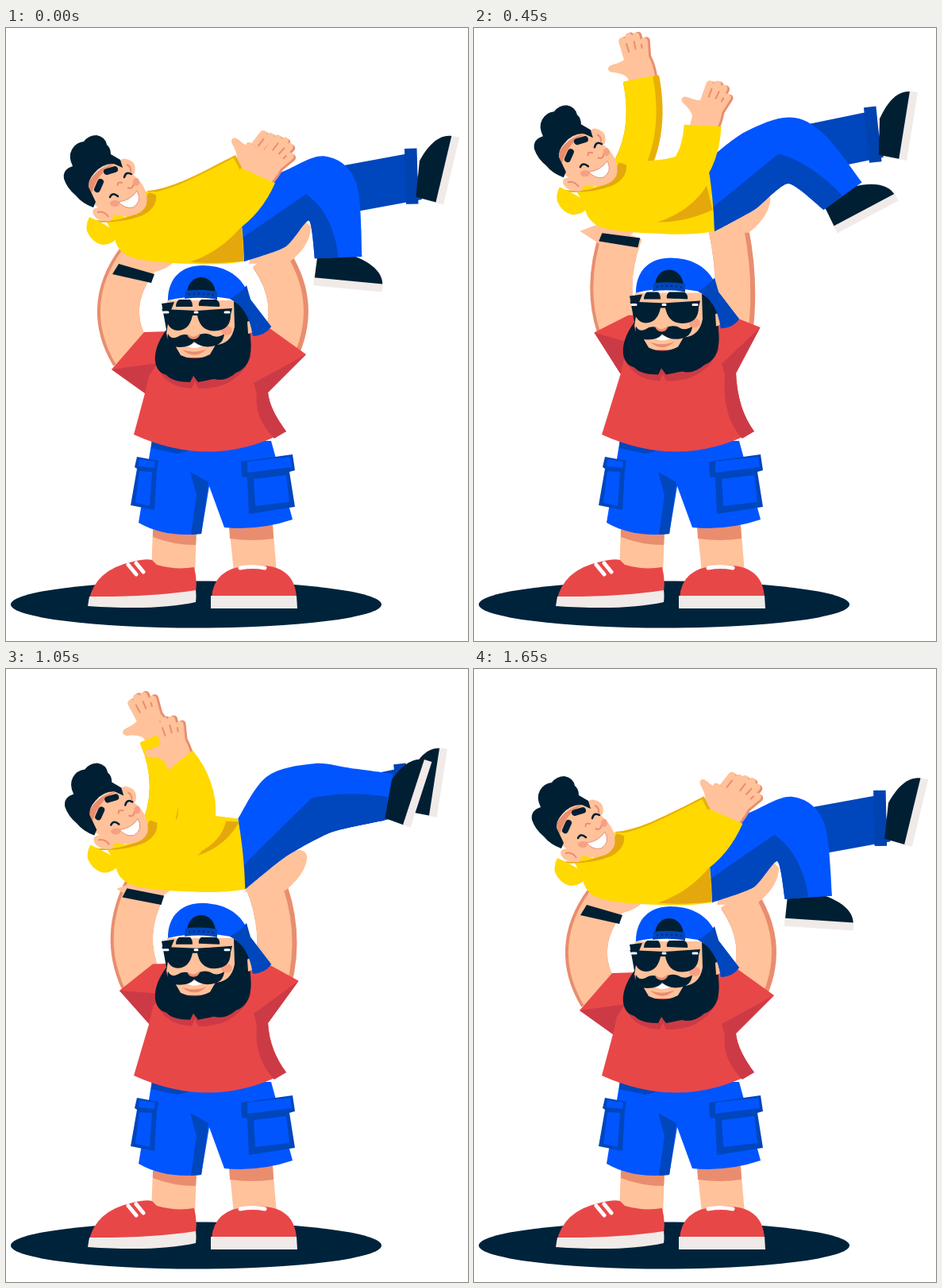
Recreate the animation shown at these times as an HTML page. Size 582 by 772 pixels, loop 1.68 s.

```html
<!DOCTYPE html>
<html lang="en">
<head>
<meta charset="utf-8">
<title>Lift</title>
<style>
  html, body { margin: 0; width: 100%; height: 100%; overflow: hidden; background: #fff; }
  svg { display: block; width: 100%; height: 100%; }
  .skin { fill: #ffc29b; } .tan { fill: #e98d6e; } .blush { fill: #f7a083; }
  .blue { fill: #05f; } .deep { fill: #0046bc; }
  .red { fill: #e84748; } .wine { fill: #cc3b45; }
  .ink { fill: #001f33; } .sole { fill: #f0ebe8; }
  .yellow { fill: #ffd900; } .gold { fill: #e5a80c; }
  .line { fill: none; stroke: #001f33; stroke-linecap: round; }
  .crease { fill: none; stroke: #e98d6e; stroke-width: 2; }
  .limb { fill: none; }
</style>
</head>
<body>
<svg viewBox="0 0 582 772" preserveAspectRatio="none">
  <defs>
    <g id="shoe">
      <path class="ink" d="M-9 43L-36 42L-42-3C-37-22-27-42-9-43Z"/>
      <path class="sole" d="M-10-43.5H0V43.5H-10Z"/>
    </g>
    <path id="fingers" fill="none" stroke-width="9.500" stroke-linecap="round" d="M24-9L52-9M24-1L55 0M24 7L53 9M22 12L44 17"/>
    <path id="palm" d="M-12-15L6-16Q13-19 19-34Q24-39 27-33Q26-22 29-13L34 14Q16 22-12 16Z"/>
    <g id="hand">
      <g transform="translate(0 3)"><use href="#palm" class="tan"/><use href="#fingers" stroke="#e98d6e"/></g>
      <use href="#palm" class="skin"/><use href="#fingers" stroke="#ffc29b"/>
      <path d="M36-5L48-5M37 4L48 5M36 12L42 13" class="crease" stroke-width="1"/>
    </g>
  </defs>

  <ellipse fill="#00233c" cx="239.500" cy="726" rx="233.500" ry="29.500"/>

  <!-- lifter's arms -->
  <g class="limb">
    <path id="armL0" stroke="#e98d6e" stroke-width="53"/><path id="armL" stroke="#ffc29b" stroke-width="49"/>
    <path id="armR0" stroke="#e98d6e" stroke-width="50"/><path id="armR" stroke="#ffc29b" stroke-width="44"/>
  </g>
  <g id="palms" class="skin">
    <path d="M144 293L168 284H218Q212 301 188 307L176 314Z"/>
    <path d="M306 297L357 295Q383 274 384 252Q380 239 362 248L312 270Z"/>
  </g>
  <path id="band" class="ink"/>

  <g id="friend">
    <use href="#hand" id="handFar"/>
    <g class="limb"><path id="sleeveFar0" stroke="#e8b006" stroke-width="46"/><path id="sleeveFar" stroke="#ffd900" stroke-width="38"/></g>
    <path id="legFar" class="limb" stroke="#0046bc" stroke-width="60"/>
    <path id="cuffFar" class="limb" stroke="#0042b0" stroke-width="70"/>
    <use href="#shoe" id="footFar"/>
    <use href="#shoe" id="footNear"/>
    <path id="leg" class="blue"/><path id="legShade" class="deep"/>
    <path class="yellow" d="M176 206Q225 207 250 200L291 205Q299 250 300 294Q270 299 235 297Q165 295 150 285Q137 276 137 262L116 226L150 238Z"/>
    <path id="fold" class="gold"/>
    <use href="#hand" id="handNear"/>
    <path id="sleeve" class="limb" stroke="#ffd900" stroke-width="47"/>
    <path class="gold" d="M104 240Q132 248 164 234L180 207L189 210Q191 226 172 236Q144 247 108 244Z"/>
    <path class="yellow" d="M105 238Q126 247 144 260Q134 274 121 273Q108 270 102 256Q100 247 105 238Z"/>

    <!-- head -->
    <path class="skin" d="M143 168Q147 162 155 166Q165 170 162 183L154 188ZM122 226Q106 225 110 235Q116 245 132 243L138 232Z"/>
    <path d="M152 172Q158 174 157 182M115 232Q124 230 129 238" class="crease"/>
    <path class="skin" d="M102 200Q108 180 136 166L148 174Q158 182 166 190Q180 205 177 222Q172 236 150 237Q126 236 110 221Z"/>
    <path class="tan" d="M103 197Q112 176 140 170Q116 180 108 208Z"/>
    <path class="ink" d="M73 190Q71 178 84 174Q78 162 83 153Q88 144 98 143Q104 135 114 135Q125 137 127 147Q132 151 132 159L144 166L147 176L136 171Q122 170 111 183Q103 192 104 200L113 219L110 226Q96 221 88 211Q77 202 73 190Z"/>
    <path class="line" stroke-width="8" d="M115 203L119 194M127 181L137 178"/>
    <path class="line" stroke-width="2.500" d="M131 213Q134 206 141 212M149 188Q151 180 158 184"/>
    <path d="M141 199Q139 193 147 195M153 201Q160 204 161 195" class="crease"/>
    <ellipse class="blush" cx="137" cy="221" rx="6" ry="4"/><ellipse class="blush" cx="164" cy="194" rx="4" ry="5"/>
    <path fill="#fff" stroke="#e98d6e" d="M142 219Q157 217 165 205Q172 219 160 226Q149 228 142 219Z"/>
  </g>

  <!-- lifter's legs and shorts -->
  <path class="skin" d="M185 630L240 634L238 686H183ZM281 626H336L341 686H287Z"/>
  <path class="tan" d="M185 632L240 634L239 651Q210 651 185 641ZM281 626H336L337 643Q310 647 282 643Z"/>
  <path class="red" d="M104 722Q112 682 160 672Q176 668 184 670L190 676Q214 683 237 679Q242 698 238 716ZM259 718Q261 680 306 677Q364 672 366 718Z"/>
  <path class="sole" d="M103 728L105 716Q180 717 239 708Q240 716 239 723Q190 734 103 728ZM258 715H366L367 731H258Z"/>
  <path d="M154 676L164 688M164 674L173 685M295 680Q311 677 326 680" fill="none" stroke="#fff" stroke-width="5" stroke-linecap="round"/>
  <path class="blue" d="M184 518L334 520L345 560L361 619Q320 633 275 629L256 577L246 637Q200 642 167 623Z"/>
  <path class="deep" d="M184 518L240 530L216 536L183 529ZM232 559L255 572L246 637L233 638L240 588Z"/>
  <path class="deep" d="M165 540L192 545L190 557L187 607L157 601L165 555L162 553ZM296 546L361 537L364 557L357 559L364 603L306 612L304 566L297 565Z"/>
  <path class="blue" d="M168 543L188 546L187 554L167 552ZM168 558L184 559L181 602L163 598ZM304 546L358 540L360 553L304 560ZM312 568L353 563L357 597L314 602Z"/>

  <path id="shirt" class="red"/><path id="shirtShade" class="wine"/>

  <!-- lifter's head -->
  <g id="head">
    <path class="wine" d="M189 420Q196 452 234 454L238 445L242 454Q290 456 309 414L300 400H195Z"/>
    <path class="skin" d="M203 343H290L300 400L270 415H212L202 384Z"/>
    <path class="ink" d="M196 347L212 345L206 360L202 385Q203 397 213 400L220 412Q238 421 257 411L264 399Q284 398 288 376L287 344L306 356L308 390Q312 426 290 434Q276 446 262 442L242 446L236 438L232 446Q210 446 202 437Q190 434 188 420Q186 402 202 380Z"/>
    <path class="skin" d="M304 370Q313 364 313 375Q311 385 305 385Z"/>
    <path class="tan" d="M222 405Q238 411 253 404Q238 419 222 405Z"/>
    <path fill="#fff" d="M223 398L253 396Q240 409 223 398Z"/>
    <path class="ink" d="M237 391Q226 382 216 389Q208 393 204 385Q201 402 219 402Q232 402 237 395Q246 403 259 401Q274 399 275 385Q266 392 257 386Q246 382 237 391Z"/>
    <ellipse class="blush" cx="278" cy="381" rx="7" ry="6"/>
    <ellipse class="skin" cx="236" cy="380" rx="8" ry="10"/>
    <path class="tan" d="M228 385Q236 393 245 384Q243 392 236 392Q229 391 228 385Z"/>
    <path class="ink" d="M218 342H232Q235 345 235 351H214Q214 345 218 342ZM246 342H265Q270 345 269 351L243 350Q242 345 246 342Z"/>
    <path class="ink" d="M196 354L240 356L285 353L283 361Q283 381 263 381.500Q245 382 241 362H235Q231 381 216 381Q203 380 201 362Z"/>
    <path d="M199 358H204M276 358H281M238 358H241" stroke="#fff" stroke-width="3" stroke-linecap="round"/>
    <path class="blue" d="M204 343C204 314 222 299 248 299C282 300 300 316 308 342L334 376Q327 387 311 388Q306 352 282 341Q244 334 204 343Z"/>
    <path class="deep" d="M282 341Q296 334 303 324L308 342L334 376Q327 387 311 388Q306 352 282 341Z"/>
    <path class="ink" d="M228 334C229 308 262 307 264 334Z"/>
    <path class="deep" d="M226 331Q246 328 266 332L266 342Q246 338 225 341Z"/>
    <path d="M230 335.500Q246 333 263 336.500" fill="none" stroke="#002a78" stroke-width="2" stroke-dasharray="2 4"/>
  </g>
</svg>
<script>
const LOOP = 1680, STEP = 30, PEAK = 570, REST = 1440;
const { PI, sin, cos } = Math;

const $ = id => document.getElementById(id);
const draw = (id, d) => $(id).setAttribute('d', d);
const place = (id, x, y, a = 0) => $(id).setAttribute('transform', `translate(${x} ${y}) rotate(${a})`);

const mix = (a, b, k) => a + (b - a) * k;
const blend = (a, b, k) => a.map((v, i) => mix(v, b[i], k));
const ease = u => .5 - .5 * cos(PI * Math.min(1, u));
// 0 to 1 and back once per loop, highest at the given time
const swing = (t, top) => .5 + .5 * cos(2 * PI * (t - top) / LOOP);
const liftAt = t => t < PEAK ? ease((t / PEAK) ** .6) : 1 - ease((t - PEAK) / (REST - PEAK));

const pairs = a => Array.from({ length: a.length / 2 }, (_, i) => a.slice(2 * i, 2 * i + 2));
const poly = a => `M${pairs(a).join('L')}Z`;
const bow = ([ax, ay, bx, by, cx, cy], dx = 0) => `M${ax + dx} ${ay}Q${bx + dx} ${by} ${cx + dx} ${cy}`;

// smooth curve through points
function smooth(p, k = 1 / 6) {
  let d = '';
  for (let i = 0; i < p.length - 1; i++) {
    const a = p[i - 1] || p[i], b = p[i], c = p[i + 1], e = p[i + 2] || c;
    d += `C${b[0] + (c[0] - a[0]) * k} ${b[1] + (c[1] - a[1]) * k} ` +
         `${c[0] - (e[0] - b[0]) * k} ${c[1] - (e[1] - b[1]) * k} ${c}`;
  }
  return d;
}

// point given in the turned frame of a foot
function onFoot([x, y, a], dx, dy) {
  const c = cos(a * PI / 180), s = sin(a * PI / 180);
  return [x + dx * c - dy * s, y + dx * s + dy * c];
}

function drawLifter(l) {
  const e = l ** .75;
  const left = blend([158, 412, 122, 352, 164, 294], [181, 374, 164, 320, 187, 256], e);
  const right = blend([346, 402, 371, 344, 332, 288], [325, 386, 334, 318, 319, 246], e);
  draw('armL0', bow(left));
  draw('armL', bow(left, 2));
  draw('armR0', bow(right));
  draw('armR', bow(right, -3));
  place('palms', -11 * l, -39 * l);
  draw('band', poly(blend([142, 297, 187, 310, 183, 321, 134, 310], [162, 257, 210, 263, 207, 275, 158, 267], e)));

  // sleeve corners: top, outer, inner
  const [a, b, c] = pairs(blend([174, 383, 133, 430, 175, 460], [195, 361, 152, 382, 185, 435], e));
  const [d, f, g] = pairs(blend([332, 378, 378, 411, 330, 459], [316, 359, 360, 376, 330, 434], e));
  draw('shirt', `M${a}L${b}L${c}L161 512Q260 557 353 508Q332 480 ${g}L${f}L${d}Z`);
  draw('shirtShade', `M${b}L${c}L${c[0] + 5} ${c[1] - 22}L${c[0] + 16} ${c[1] - 38}Z` +
    `M${f}L${g}Q332 480 353 508L338 517Q312 490 316 ${g[1] + 2}L312 ${g[1] - 12}Z`);
  place('head', 0, -10 * l);
}

function drawArm(name, low, high, k, arch, turn) {
  const p = blend(low, high, k);
  const [s, c1, c2, w] = pairs(p);
  w[1] -= arch;
  place('hand' + name, w[0], w[1], -52 - turn * k);
  return `M${s}C${c1} ${c2} ${w}`;
}

function drawArms(t) {
  const far = swing(t, 780) ** 1.3, near = (1 - swing(t, 75)) ** 1.4;
  const d = drawArm('Far', [180, 228, 218, 225, 262, 200, 300, 181],
    [190, 230, 200, 178, 188, 128, 143, 118], far, 44 * sin(PI * far), 93);
  draw('sleeveFar0', d);
  draw('sleeveFar', d);
  place('sleeveFar', -4, 0);
  draw('sleeve', drawArm('Near', [160, 250, 235, 268, 292, 244, 318, 186],
    [178, 252, 238, 252, 258, 185, 206, 130], near, 14 * sin(PI * near) ** 2, 62));
  const [a, b, c, e, f] = pairs(blend([232, 295, 270, 282, 297, 250, 300, 294, 262, 298],
    [219, 252, 268, 238, 274, 204, 292, 201, 270, 245], near));
  draw('fold', `M${a}Q${b} ${c}L${e}Q${f} ${a}Z`);
}

function drawLegs(t) {
  const kick = Math.sqrt(swing(t, 780));
  const far = blend([563, 183, 14], [546, 157, 8], kick);
  const knee = blend([425, 206], [420, 185], kick);
  draw('legFar', `M${knee}L${onFoot(far, -40, 16)}`);
  draw('cuffFar', `M${onFoot(far, -55, 20)}L${onFoot(far, -40, 16)}`);
  place('footFar', ...far);

  // the near shin swings about the knee
  const bend = swing(t, 75), shin = mix(-20, 78, bend), reach = 128 - 45 * bend * (1 - bend);
  const near = [...onFoot([400, 205, shin], reach, 0), 30 + .86 * shin];
  place('footNear', ...near);

  const top = [291, 205], low = [300, 294];
  const front = onFoot(near, -42, -14), back = onFoot(near, -34, 45);
  const [thigh, cap, calf, pit, ham, crook, inner] = pairs(blend(
    [326, 150, 385, 134, 433, 138, 410, 221, 350, 252, 384, 177, 432, 165],
    [348, 182, 402, 162, 441, 195, 381, 243, 352, 276, 378, 210, 412, 235], bend));
  const under = smooth([back, pit, ham, low], .11);
  draw('leg', `M${top}${smooth([top, thigh, cap, calf, front])}L${back}${under}Z`);
  draw('legShade', `M${low}L${blend(low, top, .33)}L${crook}Q${inner} ${blend(back, front, .5)}L${back}${under}Z`);
}

function frame(now) {
  const t = Math.floor(now % LOOP / STEP) * STEP, l = liftAt(t);
  drawLifter(l);
  place('friend', 3 * l, -39.5 * l);
  drawArms(t);
  drawLegs(t);
  requestAnimationFrame(frame);
}
frame(0);
</script>
</body>
</html>
```
